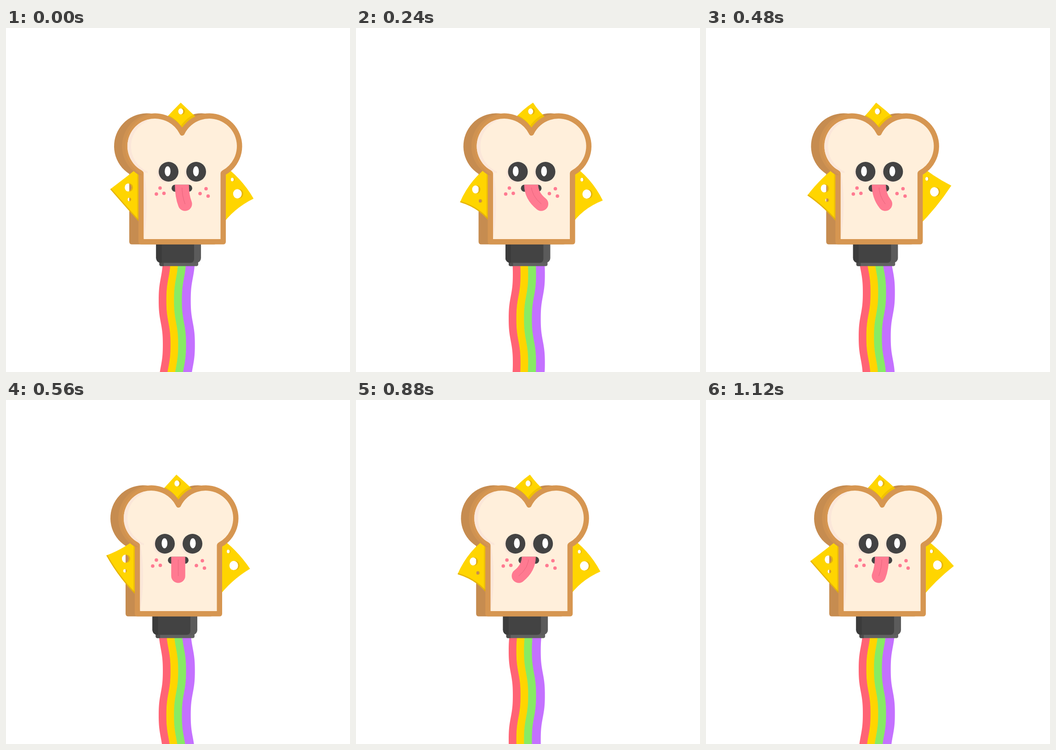
An HTML page with a canvas for the animation above (1160 ms loop, 748 by 748 pixels).

```html
<!DOCTYPE html>
<html>
<head>
<meta charset="utf-8">
<style>
html, body { margin: 0; width: 100%; height: 100%; overflow: hidden; background: #fff; }
canvas { display: block; width: 100vw; height: 100vh; }
</style>
</head>
<body>
<canvas id="stage" width="748" height="748"></canvas>
<script>
const ctx = document.getElementById('stage').getContext('2d');
const LOOP = 1160, BEAT = LOOP / 2, STEP = 40, TAU = Math.PI * 2;
const DARK = '#434343', PINK = '#ff7a91', YELLOW = '#ffd500', RIND = '#e6b40a';
const CRUST = '#d69651', BACK = '#c68c50', CREAM = '#ffefdb', BLUSH = '#fbe7d9';

// keys: [time, value] pairs of a periodic smooth curve
const SWAY = [[0, 0], [240, -1.5], [400, -4.5], [560, -8], [720, -7.5], [880, -6.8], [980, -3.8], [1120, 0]];
const RIGHT_TIP = [[0, 371], [140, 376], [240, 375], [300, 373], [400, 351], [470, 342], [540, 361], [560, 367]];
const TOP_TIP = [[0, 380], [140, 385.5], [240, 386.5], [300, 385], [400, 379.5], [470, 376.5], [540, 377], [560, 378.5]];

function curve(keys, period, time) {
  const n = keys.length, t = time % period;
  const at = i => {
    const turn = Math.floor(i / n), k = keys[i - turn * n];
    return [k[0] + turn * period, k[1]];
  };
  const slope = i => {
    const a = at(i - 1), b = at(i), c = at(i + 1);
    if ((b[1] - a[1]) * (c[1] - b[1]) <= 0) return 0;
    return (c[1] - a[1]) / (c[0] - a[0]);
  };
  let i = n - 1;
  while (i > 0 && keys[i][0] > t) i--;
  const [t0, v0] = at(i), [t1, v1] = at(i + 1);
  const h = t1 - t0, s = (t - t0) / h, r = 1 - s;
  return v0 * r * r * (1 + 2 * s) + v1 * s * s * (3 - 2 * s) +
    h * s * r * (slope(i) * r - slope(i + 1) * s);
}

// snappy swing between -1 and 1
function swing(t) {
  const s = Math.sin((t + 20) / LOOP * TAU);
  return Math.sign(s) * Math.pow(Math.abs(s), 0.53);
}

function fill(path, color, rule) {
  ctx.fillStyle = color;
  ctx.fill(path, rule || 'nonzero');
}

function oval(x, y, rx, ry, path = new Path2D()) {
  path.moveTo(x + rx, y);
  path.ellipse(x, y, rx, ry, 0, 0, TAU);
  return path;
}

function box(x, y, w, h, radii, color) {
  const p = new Path2D();
  p.roundRect(x, y, w, h, radii);
  fill(p, color);
}

function clipped(path, draw) {
  ctx.save();
  ctx.clip(path);
  draw();
  ctx.restore();
}

function crustPath(bodyX, lobeX) {
  const p = new Path2D(), R = 71.5, l = 324 + lobeX, r = 442 + lobeX;
  const left = 288 + bodyX, right = 478 + bodyX;
  const join = Math.PI - Math.acos((l - left) / R);
  const notch = Math.acos(59 / R);
  p.moveTo(left, 464.5);
  p.arc(l, 257, R, Math.PI - (Math.PI - join) * -1 - 2 * (Math.PI - join), -notch);
  p.arc(r, 257, R, Math.PI + notch, Math.acos((right - r) / R));
  p.lineTo(right, 464.5);
  p.quadraticCurveTo(right, 470.5, right - 6, 470.5);
  p.lineTo(left + 6, 470.5);
  p.quadraticCurveTo(left, 470.5, left, 464.5);
  p.closePath();
  return p;
}

function creamPath() {
  const p = new Path2D(), R = 60, low = Math.atan2(52.5, 29), tip = Math.atan2(27, 53.5);
  p.moveTo(299.5, 459);
  p.lineTo(299.5, 317);
  p.quadraticCurveTo(299.5, 312, 295, 309.5);
  p.arc(324, 257, R, Math.PI - low, -tip);
  p.bezierCurveTo(379.5, 235.5, 386.5, 235.5, 388.5, 230);
  p.arc(442, 257, R, Math.PI + tip, low);
  p.quadraticCurveTo(466.5, 312, 466.5, 317);
  p.lineTo(466.5, 459);
  p.closePath();
  return p;
}

const backSlice = crustPath(-20, -17.5), crust = crustPath(0, 0), cream = creamPath();
const innerShade = crustPath(-2, -2);

function crescent(r, shift, color) {
  const area = new Path2D();
  area.rect(200, 170, 108, 150);
  clipped(area, () => {
    const p = oval(324, 257, r + 1, r + 1);
    oval(324 + shift, 257, r, r, p);
    fill(p, color, 'evenodd');
  });
}

function rainbow(t) {
  const wave = LOOP / 6, lead = 592 + t / 6;
  const shift = y => {
    const a = (y - lead) / wave * TAU;
    return -4.5 * (1.07 * Math.cos(a) - 0.07 * Math.cos(3 * a));
  };
  const edges = [336.5, 353.2, 369.8, 387, 406.2];
  ['#ff6475', YELLOW, '#87eb64', '#c471ff'].forEach((color, i) => {
    const p = new Path2D(), over = i < 3 ? 0.6 : 0;
    for (let y = 512; y <= 750; y += 2) p.lineTo(edges[i] + shift(y), y);
    for (let y = 750; y >= 512; y -= 2) p.lineTo(edges[i + 1] + over + shift(y), y);
    fill(p, color);
  });
}

function nozzle() {
  box(333.5, 509, 84.5, 8.7, [2, 2, 4, 4], '#616161');
  box(333.5, 509, 9.5, 8.7, [2, 0, 0, 4], '#4c4c4c');
  box(326.5, 460, 97.5, 50.5, [0, 0, 10, 10], '#5b5b5b');
  box(326.5, 460, 82.5, 50.5, [0, 0, 8, 10], DARK);
  box(326.5, 460, 12, 50.5, [0, 0, 0, 10], '#3b3b3b');
}

function cheese(path, holes, edge) {
  const rims = new Path2D();
  for (const [x, y, rx, ry, depth] of holes) {
    oval(x, y, rx, ry, path);
    oval(x, y, rx, ry, rims);
    const rim = new Path2D();
    oval(x + depth, y, rx, ry, rim);
    oval(x, y, rx, ry, rim);
    rim.hole = oval(x, y, rx, ry);
    rims.list = (rims.list || []).concat(rim);
  }
  fill(path, YELLOW, 'evenodd');
  ctx.save();
  ctx.clip(path, 'evenodd');
  for (const [x, y, rx, ry, depth] of holes) fill(oval(x + depth, y, rx, ry), RIND);
  if (edge) {
    ctx.strokeStyle = RIND;
    ctx.lineWidth = 5;
    ctx.stroke(edge);
  }
  ctx.translate(-1, -4);
  fill(innerShade, 'rgba(205,145,0,.3)');
  ctx.restore();
}

// side: -1 left, 1 right; bend follows the height of the tip
function wing(side, tipX, tipY, bend) {
  const ax = 383 + side * 84, ay = 294, by = 432;
  const c1 = [(tipX + ax) / 2 + side * 13 * bend, (tipY + ay) / 2 - 11 * bend];
  const c2 = [(tipX + ax) / 2 - side * 13 * bend, (tipY + by) / 2 - 12 * bend];
  const p = new Path2D(), edge = new Path2D();
  p.moveTo(ax, ay);
  p.quadraticCurveTo(...c1, tipX, tipY);
  p.quadraticCurveTo(...c2, ax, by);
  p.closePath();
  edge.moveTo(tipX, tipY);
  edge.quadraticCurveTo(...c2, ax, by);
  return [p, edge];
}

function filling(t) {
  const flap = 338 + 41 * Math.abs(swing(t)), k = (flap - 352) / 27;
  const [lp, le] = wing(-1, 226.7 + k, flap, k);
  cheese(lp, [[265.5 - 4 * k, 347 + 4 * k, 7.5, 8.8, 3], [268 + 3.5 * k, 373 + 3 * k, 3.2, 3.8, 1.5]], le);

  const ry = curve(RIGHT_TIP, BEAT, t), q = (ry - 352) / 27;
  const [rp] = wing(1, 539.5 - 1.7 * q, ry, q);
  cheese(rp, [[503.3, 357.7 + 4 * q, 9.5, 10.2, 3], [488.6 + 5 * q, 328.5 + 1.5 * q, 3.2, 4, 1.6]]);

  const tx = curve(TOP_TIP, BEAT, t), b = (tx - 379) / 8, top = new Path2D();
  top.moveTo(345, 199);
  top.quadraticCurveTo((345 + tx) / 2 - 3 * b, 180.5 - 3 * b, tx, 162.3);
  top.quadraticCurveTo((419 + tx) / 2 - 3 * b, 180.5 + 3 * b, 419, 199);
  top.lineTo(383, 230);
  top.closePath();
  cheese(top, [[380 + 0.2 * (tx - 380), 181.3, 5.4, 6.6, 3.5]]);
}

function slice() {
  fill(crust, CRUST);
  clipped(crust, () => crescent(71.5, 7, '#cf9251'));
  fill(cream, CREAM);
  clipped(cream, () => {
    crescent(60, 8, BLUSH);
    const p = new Path2D();
    p.moveTo(299, 309);
    p.bezierCurveTo(308, 345, 309, 415, 299, 459);
    fill(p, BLUSH);
  });
}

function face(t) {
  const g = swing(t);
  for (const x of [353.5, 413.5]) fill(oval(x - 5, 315.5, 20.5, 20.5), BLUSH);
  for (const [x, d] of [[353.5, -0.8], [413.5, 0.8]]) {
    fill(oval(x, 312.5, 21.5, 21.5), DARK);
    fill(oval(x + d - 4 * g, 311.5, 6.3, 11), '#fff');
  }
  for (const [x, y] of [[335, 348], [327, 361], [343.5, 359.5], [435, 349.5], [422, 360], [439.5, 365.5]])
    fill(oval(x, y, 3.8, 3.8), PINK);

  box(360, 340.8, 45, 15.2, 7.6, DARK);
  const tongue = new Path2D(), below = new Path2D(), crease = new Path2D();
  tongue.moveTo(382.5, 341);
  tongue.quadraticCurveTo(382.5, 365, 382.5 + 22 * g, 382.5);
  below.rect(300, 340.8, 170, 80);
  crease.rect(300, 347, 170, 60);
  ctx.lineCap = 'round';
  clipped(below, () => {
    ctx.strokeStyle = PINK;
    ctx.lineWidth = 30.5;
    ctx.stroke(tongue);
  });
  clipped(crease, () => {
    ctx.strokeStyle = '#e9637c';
    ctx.lineWidth = 1;
    ctx.stroke(tongue);
  });
  ctx.lineCap = 'butt';
}

function render(now) {
  const t = Math.floor((now % LOOP) / STEP) * STEP;
  ctx.fillStyle = '#fff';
  ctx.fillRect(0, 0, 748, 748);
  rainbow(t);
  ctx.save();
  ctx.translate(curve(SWAY, LOOP, t), 0);
  nozzle();
  fill(backSlice, BACK);
  filling(t);
  slice();
  face(t);
  ctx.restore();
}

let start = null;
function tick(now) {
  if (start === null) start = now;
  render(Math.max(0, now - start));
  requestAnimationFrame(tick);
}
render(0);
requestAnimationFrame(tick);
</script>
</body>
</html>
```
